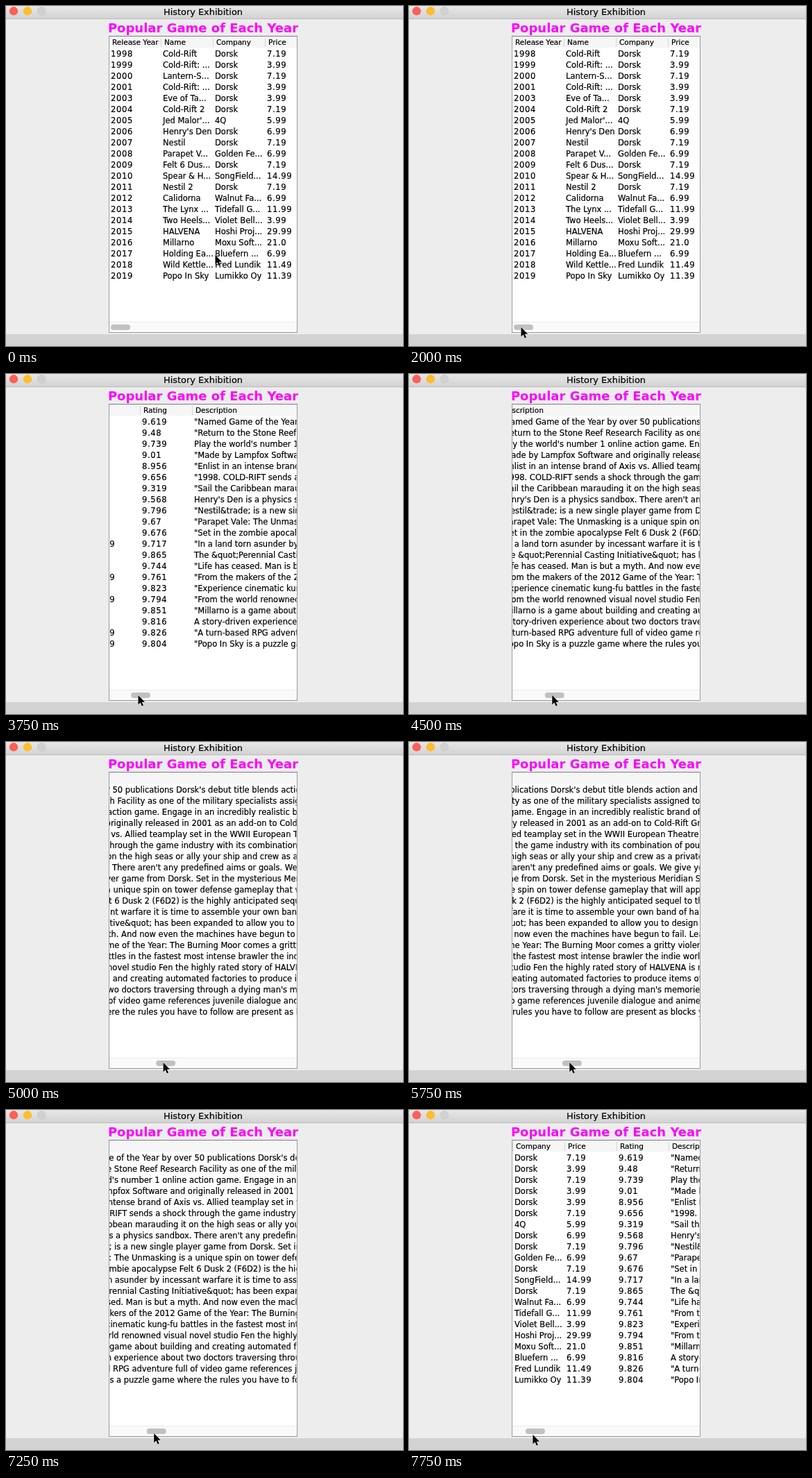
Write an HTML page that moves like this. It is 572x490 px and loops after 8000 ms.

```html
<!DOCTYPE html>
<html lang="en">
<head>
<meta charset="utf-8">
<title>History Exhibition</title>
<style>
  html, body { margin: 0; width: 100%; height: 100%; overflow: hidden; background: #ededed; }
  svg { display: block; width: 572px; height: 490px; font-family: "DejaVu Sans", Verdana, sans-serif; }
  text { white-space: pre; stroke: #000; stroke-width: .2px; }
  .bar { font-size: 12.9px; text-anchor: middle; }
  .title { font-size: 18px; font-weight: bold; fill: #f0f; stroke: none; text-anchor: middle; }
  .head { font-size: 10.5px; }
  .cell { font-size: 11.5px; }
  .num { letter-spacing: .65px; }
</style>
</head>
<body>
<svg viewBox="0 0 572 490">
  <defs>
    <linearGradient id="chrome" x2="0" y2="1">
      <stop stop-color="#e7e7e7"/><stop offset="1" stop-color="#d3d3d3"/>
    </linearGradient>
    <clipPath id="view"><rect x="149" y="44" width="269.5" height="411"/></clipPath>
  </defs>

  <rect width="572" height="490" fill="#ededed"/>
  <rect width="572" height="18" fill="url(#chrome)"/>
  <rect y="18" width="572" height="1" fill="#b9b9b9"/>
  <circle cx="11" cy="7.3" r="6.2" fill="#fc5f5a"/>
  <circle cx="31" cy="7.3" r="6.2" fill="#fdbd2f"/>
  <circle cx="51" cy="7.3" r="6" fill="#d1d1d1" stroke="#c2c2c2" stroke-width=".5"/>
  <text class="bar" x="284" y="13">History Exhibition</text>
  <text class="title" x="284" y="38">Popular Game of Each Year</text>
  <rect y="473" width="572" height="17" fill="#d3d3d3"/>

  <rect x="148.5" y="43.5" width="271" height="427" fill="#fff" stroke="#9b9b9b"/>
  <path d="M148 43.5H420" stroke="#808080"/>
  <rect x="149" y="44" width="270" height="16" fill="#f6f6f6"/>
  <rect x="149" y="455" width="270" height="15" fill="#fafafa"/>
  <path d="M149 455.5H419" stroke="#ebebeb"/>

  <g clip-path="url(#view)"><g id="table"></g></g>
  <rect id="thumb" x="151" y="459" width="28" height="8" rx="4" fill="#c1c1c1"/>
  <path id="cursor" d="M0 0V13.4L3.1 10.6L5.3 15.6L7.5 14.7L5.3 9.8H9.5Z"
        fill="#000" stroke="#fff" stroke-width=".8" paint-order="stroke"/>
</svg>

<script>
const LOOP = 8000, LEFT = 149, COL = 75, ROW = 16, RATIO = 8.8;

const heads = ["Release Year", "Name", "Company", "Price", "Rating", "Description"];

// year | name | company | price | rating | description
const rows = `
1998|Cold-Rift|Dorsk|7.19|9.619|"Named Game of the Year by over 50 publications Dorsk's debut title blends action and adventure with award-winning technology
1999|Cold-Rift: ...|Dorsk|3.99|9.48|"Return to the Stone Reef Research Facility as one of the military specialists assigned to eliminate Calvin Stroude.
2000|Lantern-S...|Dorsk|7.19|9.739|Play the world's number 1 online action game. Engage in an incredibly realistic brand of terrorist warfare in this game.
2001|Cold-Rift: ...|Dorsk|3.99|9.01|"Made by Lampfox Software and originally released in 2001 as an add-on to Cold-Rift Gray Field is a return to the Stone Reef
2003|Eve of Ta...|Dorsk|3.99|8.956|"Enlist in an intense brand of Axis vs. Allied teamplay set in the WWII European Theatre of Operations. Players assume the role
2004|Cold-Rift 2|Dorsk|7.19|9.656|"1998. COLD-RIFT sends a shock through the game industry with its combination of pounding action and continuous storytelling.
2005|Jed Malor'...|4Q|5.99|9.319|"Sail the Caribbean marauding it on the high seas or ally your ship and crew as a privateer in search of fame and fortune.
2006|Henry's Den|Dorsk|6.99|9.568|Henry's Den is a physics sandbox. There aren't any predefined aims or goals. We give you the tools and leave you to play.
2007|Nestil|Dorsk|7.19|9.796|"Nestil&trade; is a new single player game from Dorsk. Set in the mysterious Meridian Science Laboratories
2008|Parapet V...|Golden Fe...|6.99|9.67|"Parapet Vale: The Unmasking is a unique spin on tower defense gameplay that will appeal to players of all skill levels
2009|Felt 6 Dus...|Dorsk|7.19|9.676|"Set in the zombie apocalypse Felt 6 Dusk 2 (F6D2) is the highly anticipated sequel to the award-winning hit
2010|Spear & H...|SongField...|14.99|9.717|"In a land torn asunder by incessant warfare it is time to assemble your own band of hardened warriors and enter the fray.
2011|Nestil 2|Dorsk|7.19|9.865|The &quot;Perennial Casting Initiative&quot; has been expanded to allow you to design co-op puzzles for you and your friends!
2012|Calidorna|Walnut Fa...|6.99|9.744|"Life has ceased. Man is but a myth. And now even the machines have begun to fail. Lead Lucerio Ashforged and his companion
2013|The Lynx ...|Tidefall G...|11.99|9.761|"From the makers of the 2012 Game of the Year: The Burning Moor comes a gritty violent and mature thriller
2014|Two Heels...|Violet Bell...|3.99|9.823|"Experience cinematic kung-fu battles in the fastest most intense brawler the indie world has ever seen!
2015|HALVENA|Hoshi Proj...|29.99|9.794|"From the world renowned visual novel studio Fen the highly rated story of HALVENA is now available in English
2016|Millarno|Moxu Soft...|21.0|9.851|"Millarno is a game about building and creating automated factories to produce items of increasing complexity
2017|Holding Ea...|Bluefern ...|6.99|9.816|A story-driven experience about two doctors traversing through a dying man's memories to artificially fulfill his last wish.
2018|Wild Kettle...|Fred Lundik|11.49|9.826|"A turn-based RPG adventure full of video game references juvenile dialogue and anime fanservice... I mean good writing
2019|Popo In Sky|Lumikko Oy|11.39|9.804|"Popo In Sky is a puzzle game where the rules you have to follow are present as blocks you can interact with.
`.trim().split("\n").map(line => line.split("|"));

// pointer on its way to the scroll bar: time, x, y
const reach = [
  [0, 301.5, 359], [250, 268, 386], [500, 205, 436], [750, 169, 462],
  [1000, 162, 464], [2000, 162, 463]
];

// dragging the thumb: time, scroll offset, pointer y
const drag = [
  [2000, 0, 463], [2250, 9, 463], [2500, 26, 463], [2750, 52, 463], [3000, 96, 463],
  [3250, 148, 463], [3500, 201, 463], [3750, 255, 463], [4000, 306, 463],
  [4500, 394, 463], [4750, 490, 463], [5000, 573, 462],
  [5500, 588, 462], [5750, 614, 462], [6000, 644, 462], [6250, 670, 462], [6500, 687, 462],
  [7000, 622, 464], [7250, 455, 466], [7500, 280, 467], [7750, 149, 468]
];

const $ = id => document.getElementById(id);
const table = $("table"), thumb = $("thumb"), cursor = $("cursor");

function add(tag, attrs, text) {
  const el = document.createElementNS("http://www.w3.org/2000/svg", tag);
  for (const key in attrs) el.setAttribute(key, attrs[key]);
  if (text) el.textContent = text;
  table.append(el);
}

heads.forEach((name, i) => {
  const x = LEFT + i * COL;
  add("text", { class: "head", x: x + 4, y: 56 }, name);
  if (i) add("path", { d: `M${x - .5} 46V59`, stroke: "#d6d6d6" });
});

rows.forEach((cells, r) => cells.forEach((value, c) => {
  const numeric = c === 0 || c === 3 || c === 4;
  add("text", {
    class: numeric ? "cell num" : "cell",
    x: LEFT + c * COL + 2,
    y: 73 + r * ROW
  }, value);
}));

const at = (steps, t) => steps.filter(s => s[0] <= t).pop();
const move = (el, x, y) => el.setAttribute("transform", `translate(${x} ${y})`);

function draw(now) {
  const t = now % LOOP;
  let scroll = 0, x, y;
  if (t < drag[0][0]) {
    [, x, y] = at(reach, t);
  } else {
    [, scroll, y] = at(drag, t);
    x = 161.5 + scroll / RATIO;
  }
  move(table, -scroll, 0);
  move(thumb, scroll / RATIO, 0);
  move(cursor, x, y);
}

const start = performance.now();
function tick() {
  draw(performance.now() - start);
  requestAnimationFrame(tick);
}
tick();
</script>
</body>
</html>
```
